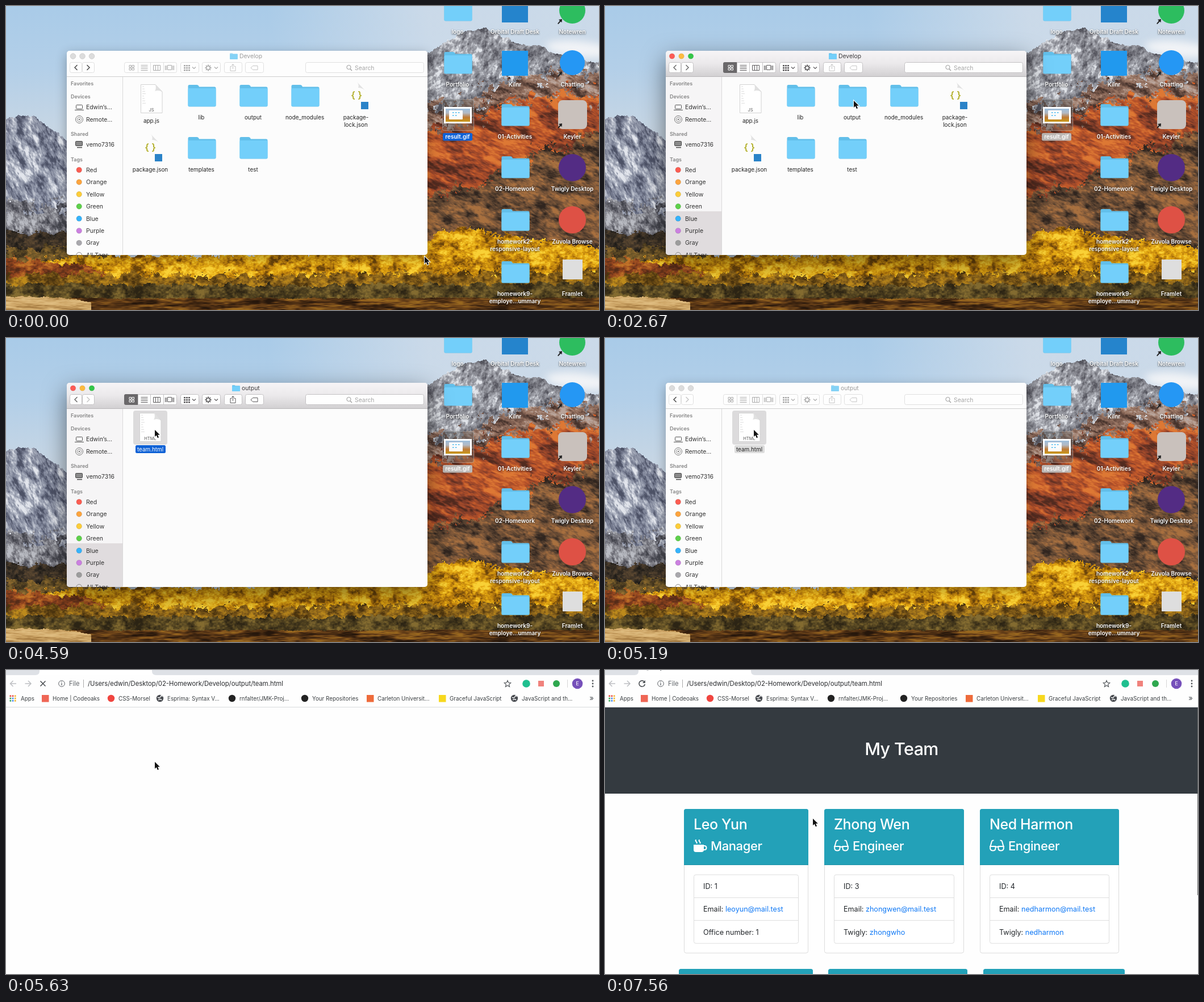
Recreate the animation shown at these times as an HTML page with a canvas. Size 1044 by 536 pixels, loop 8 s.

```html
<!DOCTYPE html>
<html lang="en">
<head>
<meta charset="utf-8">
<title>Opening a generated team page</title>
<style>
  html, body { margin: 0; width: 100%; height: 100%; overflow: hidden; background: #fff; }
  canvas { display: block; }
</style>
</head>
<body>
<canvas id="stage" width="1044" height="536"></canvas>
<script>
const W = 1044, H = 536, LOOP = 8000;
const screen = document.getElementById('stage').getContext('2d');
let c = screen;

// ---------- drawing helpers ----------
function text(str, x, y, size, color, align = 'left', weight = 400, spacing = 0) {
  c.font = `${weight} ${size}px Inter, sans-serif`;
  c.letterSpacing = spacing + 'px';
  c.textAlign = align;
  c.fillStyle = color;
  c.fillText(str, x, y + size * 0.36);
  return c.measureText(str).width;
}
function box(x, y, w, h, r, fill, border) {
  c.beginPath();
  c.roundRect(x, y, w, h, r);
  if (fill) { c.fillStyle = fill; c.fill(); }
  if (border) { c.strokeStyle = border; c.lineWidth = 1; c.stroke(); }
}
function dot(x, y, r, fill, border) {
  box(x - r, y - r, 2 * r, 2 * r, r, fill, border);
}
function fill(d, color) { c.fillStyle = color; c.fill(new Path2D(d)); }
function stroke(d, color, width = 1) {
  c.strokeStyle = color;
  c.lineWidth = width;
  c.stroke(new Path2D(d));
}
function at(x, y, draw) {
  c.save();
  c.translate(x, y);
  draw();
  c.restore();
}
function gradient(x0, y0, x1, y1, ...colors) {
  const g = c.createLinearGradient(x0, y0, x1, y1);
  colors.forEach((color, i) => g.addColorStop(i / (colors.length - 1), color));
  return g;
}
function shadow(color, blur, dy) {
  c.shadowColor = color;
  c.shadowBlur = blur;
  c.shadowOffsetY = dy;
}

// ---------- noise landscape ----------
function hash(x, y) {
  let h = Math.imul(x, 374761393) + Math.imul(y, 668265263);
  h = Math.imul(h ^ (h >>> 13), 1274126177);
  return ((h ^ (h >>> 16)) >>> 0) / 4294967296;
}
function noise(x, y) {
  const i = Math.floor(x), j = Math.floor(y);
  const ease = v => v * v * (3 - 2 * v);
  const u = ease(x - i), v = ease(y - j);
  const top = hash(i, j) * (1 - u) + hash(i + 1, j) * u;
  const bottom = hash(i, j + 1) * (1 - u) + hash(i + 1, j + 1) * u;
  return top * (1 - v) + bottom * v;
}
function roughness(x, y) {
  return (noise(x, y) + noise(x * 2, y * 2) * .7 + noise(x * 4, y * 4) * .55 + noise(x * 8, y * 8) * .45) / 2.7;
}
// Covers everything below a ragged ridge with noise coloured from dark to light.
function terrain(image, ridge, palette, { grain = [14, 10], slant = 0, jag = 16 }) {
  const colors = palette.split(' ').map(s => [0, 2, 4].map(i => parseInt(s.slice(i, i + 2), 16)));
  const last = colors.length - 1;
  for (let k = 0; k + 1 < ridge.length; k++) {
    const [x0, y0] = ridge[k], [x1, y1] = ridge[k + 1];
    for (let x = x0; x < x1; x++) {
      const edge = y0 + (y1 - y0) * (x - x0) / (x1 - x0);
      for (let y = Math.max(0, Math.floor(edge - jag)); y < H; y++) {
        const n = roughness((x - y * slant) / grain[0], (y + x * slant) / grain[1]);
        if (y < edge + jag && y < edge + (roughness(x / 14, y / 14 + 50) - .5) * jag * 3) continue;
        const shade = Math.min(.999, Math.max(0, (n - .5) * 2.3 + .5)) * last;
        const low = Math.floor(shade), mix = shade - low, p = (y * W + x) * 4;
        for (let i = 0; i < 3; i++) image.data[p + i] = colors[low][i] * (1 - mix) + colors[low + 1][i] * mix;
      }
    }
  }
}

function wallpaper() {
  c.fillStyle = gradient(0, 0, 0, 220, '#a9cbe8', '#b3cfe8', '#c7d6e4');
  c.fillRect(0, 0, W, H);
  c.fillStyle = gradient(470, 60, 740, 0, 'rgba(208,220,233,0)', 'rgba(208,220,233,.85)');
  c.fillRect(0, 0, W, 200);
  c.save();
  c.filter = 'blur(7px)';
  c.fillStyle = '#f1f3f6';
  c.beginPath();
  c.ellipse(1010, 76, 60, 14, 0.1, 0, 7);
  c.fill();
  c.restore();

  const image = c.getImageData(0, 0, W, H);
  // left range, its shaded foot and the dark woods
  terrain(image, [[0, 198], [20, 193], [48, 192], [75, 212], [107, 238], [150, 262], [190, 280]],
    '4d5266 7b8195 a3a9b8 e2e5ec', { grain: [11, 26], slant: .5, jag: 4 });
  terrain(image, [[0, 345], [60, 352], [190, 365]], '43444c 66666f 8f9097 b9bbc2', { grain: [11, 18], slant: .5, jag: 30 });
  terrain(image, [[0, 394], [50, 401], [190, 396]], '1f1c18 3b3126 5c4831', { grain: [12, 9], jag: 8 });
  terrain(image, [[0, 425], [190, 428]], '3b2f1c 6c5528 976f30', { jag: 10 });
  // right peak, autumn slopes and brown foothills
  terrain(image, [[740, 84], [775, 62], [800, 48], [845, 38], [870, 52], [900, 66], [940, 70], [960, 82], [W, 98]],
    '53535c 82838b a2a4ac e2e5ea', { grain: [14, 20], slant: -.5, jag: 4 });
  terrain(image, [[740, 178], [800, 172], [850, 155], [900, 128], [960, 118], [W, 122]],
    '46332c 77584b 9b7866 b9a49a', { grain: [24, 12], slant: -.4, jag: 32 });
  terrain(image, [[740, 218], [800, 196], [860, 180], [920, 160], [W, 156]],
    '512a1f 8a402a bd562a dd7834', { grain: [40, 14], slant: -.4, jag: 30 });
  terrain(image, [[740, 335], [830, 318], [900, 275], [970, 250], [W, 222]],
    '30251f 56402f 80593a a8703f', { grain: [30, 13], slant: -.4, jag: 26 });
  // golden trees, undergrowth, shrubs, water and dry grass
  terrain(image, [[0, 450], [110, 442], [400, 438], [740, 420], [760, 397], [800, 389], [850, 396], [900, 409], [W, 424]],
    '6a440b b4780d e4a812 f9d136', { grain: [18, 14], jag: 10 });
  terrain(image, [[0, 440], [110, 452], [170, 470], [230, 492]], '552b18 94461f c27428', { grain: [20, 12], jag: 12 });
  terrain(image, [[0, 474], [740, 472], [W, 470]], '4b340f 87601a bd8a1c', { grain: [16, 12], jag: 12 });
  terrain(image, [[0, 492], [740, 491], [W, 488]], '2c2414 524320 836b30', { grain: [18, 14], jag: 7 });
  terrain(image, [[0, 515], [W, 514]], '25160b 482b12 72471a 99681f', { grain: [50, 6], jag: 2 });
  terrain(image, [[0, 511], [100, 514], [150, 523]], 'a67c42 cda566 e0be82', { grain: [40, 5], jag: 3 });
  c.putImageData(image, 0, 0);
}

// ---------- shared icons ----------
function folder(x, y, w = 50) {
  at(x, y, () => {
    c.scale(w / 50, w / 50);
    fill('M.5 3Q.5 1 3 1H16Q18 1 19 2.500L20 4.500H47Q49.500 4.500 49.500 7V37Q49.500 39.500 47 39.500H3Q.5 39.500 .5 37Z', '#62bfea');
    box(.5, 7, 49, 32, 2, '#73cffa');
  });
}
function page(x, y, label) {
  at(x, y, () => {
    fill('M0 0H26L38 13V51H0Z', '#fff');
    stroke('M.5 .5H26L38 13V50.5H.5Z', '#d2d2d2');
    fill('M26 0Q28 8 25 12Q33 9 38 14Z', '#e0e0e0');
    for (let i = 0; i < 8; i++) stroke(`M3 ${4 + i * 4.2}h${3 + (i * 5) % 4}`, '#d4d4d4', 0.8);
    text(label, 19, 45, 7.5, '#555', 'center');
  });
}
function jsonFile(x, y) {
  fill(`M${x + 1} ${y - 23}Q${x + 5} ${y - 18} ${x + 3} ${y - 13}Q${x + 12} ${y - 13} ${x + 18} ${y - 5}Z`, '#e2e2e2');
  text('{ }', x, y, 17, '#b3b02c', 'center', 600);
  box(x + 8, y + 12, 13, 13, 0, '#2a83c8');
}
function cursor(x, y) {
  at(x, y, () => {
    const arrow = 'M0 0V12L2.8 9.5 4.9 14.2 7 13.3 5 8.7H8.8Z';
    stroke(arrow, '#fff', 2);
    fill(arrow, '#111');
  });
}

// ---------- desktop ----------
function iconLabel(str, x, y) {
  c.save();
  shadow('rgba(0,0,0,.8)', 3, 1);
  text(str, x, y, 10, '#fff', 'center', 600);
  c.restore();
}
function aliasArrow(x, y) {
  fill(`M${x} ${y + 8}L${x + 4} ${y + 3} ${x + 2} ${y + 1} ${x + 8} ${y} ${x + 7.5} ${y + 6} ${x + 5.5} ${y + 4.5} ${x + 1.5} ${y + 9}Z`, '#222');
}
function desktopIcons() {
  const folders = [
    [795, 45, 'logo'], [795, 138, 'Portfolio'], [896, 230, '01-Activities'], [896, 322, '02-Homework'],
    [896, 415, 'homework2-', 'responsive-layout'], [896, 507, 'homework9-', 'employe...ummary']];
  for (const [x, y, ...lines] of folders) {
    folder(x - 24, y - 58);
    lines.forEach((line, i) => iconLabel(line, x, y + i * 13.5));
  }
  box(873, -17, 46, 46, 0, '#2584cc');
  box(873, 79, 46, 44, 0, '#2199ee');
  dot(997, 8, 23, '#2dbd5f');
  dot(997, 100, 22, '#2597f4');
  box(972, 166, 51, 51, 8, '#c9c1bc');
  dot(997, 285, 24, '#532c84');
  dot(997, 377, 24, '#de5145');
  box(980, 447, 35, 35, 0, '#dedede');
  aliasArrow(971, 23);
  aliasArrow(971, 116);
  aliasArrow(971, 207);
  iconLabel('Orbital Draft Desk', 896, 45);
  iconLabel('Notewren', 997, 45);
  iconLabel('Kilnr', 896, 138);
  iconLabel('Chatting', 997, 138);
  iconLabel('Keyler', 997, 230);
  iconLabel('Twigly Desktop', 997, 322);
  iconLabel('Zuvola Browse', 997, 415);
  iconLabel('Framlet', 997, 507);

  box(768.5, 164.5, 55, 55, 3, 'rgba(90,90,90,.45)', 'rgba(190,190,190,.5)');
  box(771, 178, 49, 29, 0, '#fff');
  c.fillStyle = gradient(0, 181, 0, 204, '#9ebfdc', '#b3bac5', '#c07a35', '#c99a1b');
  c.fillRect(774, 181, 43, 23);
  box(780, 184, 24, 16, 1, '#fbfbfb');
  for (let i = 0; i < 5; i++) box(786 + (i % 3) * 5, 187 + (i > 2) * 5, 2.5, 2, 0, '#6fc8f3');
}

const desktop = document.createElement('canvas');
desktop.width = W;
desktop.height = H;
c = desktop.getContext('2d');
wallpaper();
desktopIcons();
c = screen;

// ---------- file window ----------
function toolbar(active, inOutput, selected) {
  const edge = active ? '#c4c2c4' : '#e0e0e0';
  const icon = active ? '#5c5a5c' : '#ababab';
  const button = (x, w) => box(x + .5, 99.5, w, 18, 3, '#fefefe', edge);
  const chevron = (x, y, color) => stroke(`M${x - 3} ${y - 1.5}l3 3 3-3`, color, 1.2);

  ['#fc5b55', '#fcbb40', '#34c648'].forEach((color, i) =>
    dot(118 + i * 16.5, 88.5, 4.8, active ? color : '#dcdcdc', active ? 'rgba(0,0,0,.08)' : '#cfcfcf'));
  c.globalAlpha = active ? 1 : .6;
  folder(inOutput ? 398 : 394, 83, 14);
  c.globalAlpha = 1;
  text(inOutput ? 'output' : 'Develop', inOutput ? 415 : 411, 88.5, 10.4, active ? '#3d3b3d' : '#9c9c9c');

  button(112, 21);
  button(134, 21);
  stroke('M125.5 104l-4.5 4.5 4.5 4.5', active ? '#666' : '#444', 1.4);
  stroke('M142.5 104l4.5 4.5-4.5 4.5', inOutput ? '#c4c4c4' : active ? '#666' : '#444', 1.4);

  button(208, 92);
  if (active) box(208, 99, 24, 19, [3, 0, 0, 3], '#6a686a');
  stroke('M232.5 100v18M254.5 100v18M277.5 100v18', edge);
  const gridColor = active ? '#fff' : icon;
  for (const [dx, dy] of [[0, 0], [5, 0], [0, 5], [5, 5]]) box(217 + dx, 104.5 + dy, 3.5, 3.5, 0, null, gridColor);
  stroke('M237.5 104.5h12M237.5 107.5h12M237.5 110.5h12M237.5 113.5h12', icon, 1.2);
  stroke('M259.5 104.5h12v9h-12zM263.5 104.5v9M267.5 104.5v9', icon);
  stroke('M284.5 104.5h7v8h-7zM280.5 105v8M282.5 105v8M293.5 105v8M295.5 105v8', icon);

  button(307, 32);
  for (let i = 0; i < 9; i++) box(313 + (i % 3) * 4, 104 + Math.floor(i / 3) * 4, 3, 2.5, 0, icon);
  chevron(331, 109, icon);
  button(345, 32);
  dot(356, 109, 3.2, null, icon);
  for (let a = 0; a < 8; a++) at(356, 109, () => { c.rotate(a * Math.PI / 4); box(-1, -5.5, 2, 3, 0, icon); });
  chevron(370, 109, icon);

  const action = active && selected ? '#5c5a5c' : '#c6c6c6';
  button(384, 31);
  stroke('M397.5 106.5h-2.5v8h9v-8h-2.5M399.5 111v-8.5M397 105l2.5-2.5 2.5 2.5', action);
  button(421, 32);
  stroke('M431 109l3.5-3.5h8.5v7h-8.5z', action);

  button(527, 208);
  dot(603.5, 108, 3.6, null, '#9a9a9a');
  stroke('M606 111l3 3', '#9a9a9a', 1.2);
  text('Search', 614, 109, 10.4, '#a6a6a6');
}

function sidebar(active) {
  c.fillStyle = active ? '#f6f5f6' : '#fcfcfc';
  c.fillRect(107, 125, 98, 313);
  if (active) {
    c.fillStyle = '#e0dcde';
    c.fillRect(107, 362, 98, 77);
  }
  c.fillStyle = '#dadada';
  c.fillRect(205, 125, 1, 313);
  [['Favorites', 137], ['Devices', 160], ['Shared', 226], ['Tags', 271]].forEach(([s, y]) =>
    text(s, 114, y, 9, '#858585', 'left', 600));
  text('Edwin’s...', 141, 178.5, 10.4, '#333');
  text('Remote...', 141, 200, 10.4, '#333');
  text('vemo7316', 141, 244.5, 10.4, '#333');
  box(123.5, 174.5, 11, 7, 1, null, '#555');
  stroke('M121 183.5h16', '#555', 1.2);
  dot(129, 200, 6.5, null, '#777');
  dot(129, 200, 3.8, null, '#999');
  dot(129, 200, 1.3, '#777');
  box(122.5, 238.5, 12, 8, 1, '#8a8a8a', '#444');
  stroke('M125 249.5h9', '#444', 1.5);
  const tags = [['Red', '#fb5c51'], ['Orange', '#fca43e'], ['Yellow', '#fccd3a'], ['Green', '#5ed04b'],
    ['Blue', '#35b3fb'], ['Purple', '#cb80e0'], ['Gray', active ? '#9c9c9c' : '#a9a8ad'], ['All Tags...', null]];
  tags.forEach(([name, color], i) => {
    const y = 289 + i * 21.45;
    dot(128.7, y, 4.8, color, color ? 'rgba(0,0,0,.12)' : '#888');
    text(name, 141, y, 10.5, '#333');
  });
}

function selection(x, y, active) {
  box(x - 30, y - 68, 60, 60, 4, '#dcdbdc');
  box(x - 26, y - 7, 53, 14, 2.5, active ? '#0f62d6' : '#dcdcdc');
}
function files(active, inOutput, selected) {
  const label = (s, x, y, color = '#222') => text(s, x, y, 9.9, color, 'center');
  const picked = selected && active ? '#fff' : '#222';
  if (inOutput) {
    if (selected) selection(254, 196, active);
    page(235, 132, 'HTML');
    label('team.html', 254, 196, picked);
    return;
  }
  if (selected) selection(435, 196, active);
  page(237, 138, 'JS');
  label('app.js', 256, 202);
  for (const [name, x, y] of [['lib', 344, 196], ['output', 435, 196], ['node_modules', 526, 196],
    ['templates', 344, 288], ['test', 435, 288]]) {
    folder(x - 24, y - 58);
    label(name, x, y, name === 'output' ? picked : '#222');
  }
  jsonFile(617, 157);
  label('package-', 616, 196);
  label('lock.json', 616, 209);
  jsonFile(254, 249);
  label('package.json', 254, 288);
}

function fileWindow(active, inOutput, selected) {
  c.save();
  shadow(active ? 'rgba(0,0,0,.5)' : 'rgba(0,0,0,.3)', active ? 40 : 20, active ? 14 : 6);
  box(107, 79, 635, 360, 5, '#fcfcfc');
  c.restore();
  c.save();
  c.beginPath();
  c.roundRect(107, 79, 635, 360, 5);
  c.clip();
  c.fillStyle = active ? gradient(0, 79, 0, 124, '#f6f4f6', '#ebe9eb', '#d2d0d2') : '#fdfdfd';
  c.fillRect(107, 79, 635, 45);
  c.fillStyle = active ? '#b9b7b9' : '#cfcfcf';
  c.fillRect(107, 124, 635, 1);
  sidebar(active);
  toolbar(active, inOutput, selected);
  files(active, inOutput, selected);
  c.restore();
}

// ---------- browser ----------
const bookmarks = [
  [69, '#ef6655', 'square', 'Home | Codeoaks'], [185, '#f0453f', 'circle', 'CSS-Morsel'],
  [271, '#484b50', 'globe', 'Esprima: Syntax V...'], [398, '#222', 'circle', 'rnfalter/JMK-Proj...'],
  [526, '#222', 'circle', 'Your Repositories'], [641, '#ee6b3b', 'square', 'Carleton Universit...'],
  [768, '#f7d81e', 'square', 'Graceful JavaScript'], [895, '#484b50', 'globe', 'JavaScript and th...']];

function browserBar(loading, title) {
  c.fillStyle = '#dee1e6';
  c.fillRect(-7, -26, 1060, 35);
  fill('M52 9Q59 9 59 2V-12Q59 -19 66 -19H250Q257 -19 257 -12V2Q257 9 264 9Z', '#fff');
  ['#f8605a', '#f9bd45', '#4bc353'].forEach((color, i) => dot(9 + i * 16, -9, 5.5, color));
  if (title !== 'Untitled') dot(75, -5, 5.5, '#5f6368');
  text(title, 87, -5, 10.5, '#45494d');
  stroke('M240-8l6 6m0-6l-6 6M269-5h10m-5-5v10', '#5f6368', 1.4);

  stroke('M18 24H7.5m5-5l-5 5 5 5', '#bdbfc2', 1.5);
  stroke('M33.5 24H44m-5-5l5 5-5 5', '#bdbfc2', 1.5);
  if (loading) stroke('M60.5 19.5l9 9m0-9l-9 9', '#4c5054', 1.6);
  else {
    stroke('M69 20.5A5.2 5.2 0 1 0 70.3 25', '#4c5054', 1.6);
    fill('M70.8 18v5h-5z', '#4c5054');
  }
  dot(98, 24, 5.3, null, '#5f6368');
  stroke('M98 23v4M98 20.6v1.2', '#5f6368', 1.3);
  text('File', 111, 24, 11.2, '#5f6368');
  stroke('M136.5 17v14', '#aaa');
  text('/Users/edwin/Desktop/02-Homework/Develop/output/team.html', 144, 24, 11.3, '#2a2c2f');
  stroke('M883 18.5l1.6 3.8 4.1.4-3.1 2.7.9 4-3.5-2.1-3.5 2.1.9-4-3.1-2.7 4.1-.4z', '#55595d', 1.2);
  dot(916, 24, 6.8, '#1fbf8f');
  box(937, 19, 10, 10, 0, '#f0827c');
  dot(969, 24, 6, '#2fa84f');
  stroke('M988.5 17v14', '#d5d5d5');
  dot(1006, 24, 9.3, '#7650ba');
  text('E', 1006, 24, 9.5, '#fff', 'center');
  for (const y of [19, 24, 29]) dot(1033, y, 1.4, '#55595d');

  ['#e8453c', '#e8453c', '#f2b632', '#3aa757', '#4285f4', '#f2b632', '#3aa757', '#4285f4', '#f2b632'].forEach((color, i) =>
    box(6.5 + (i % 3) * 4.2, 44.5 + Math.floor(i / 3) * 4.2, 2.7, 2.7, 0, color));
  text('Apps', 26, 50, 9.8, '#3c4043');
  for (const [x, color, shape, name] of bookmarks) {
    if (shape === 'square') box(x - 6, 44, 12.5, 12.5, 0, color);
    else dot(x, 50, 6.2, color);
    if (shape === 'globe') stroke(`M${x - 4} 48q3 3 5-1t3 0M${x - 3} 53q4-3 6 0`, '#fff', 1.4);
    text(name, x + 13, 50, 9.8, '#3c4043');
  }
  text('»', 1031, 49.5, 13, '#4c5054', 'center');
  c.fillStyle = '#d8dadd';
  c.fillRect(-7, 65, 1060, 1);
}

const mug = () => {
  fill('M0 9H18V18Q18 22 14 22H4Q0 22 0 18Z', '#fff');
  stroke('M17 11H19Q22.5 11 22.5 14.5T19 18H17', '#fff', 2);
  stroke('M5.5 7Q6 4.5 4.5 3.5T4 0M11.5 7Q12 4.5 10.5 3.5T10 0', '#fff', 2);
};
const glasses = () => {
  stroke('M1.2 12H10.5V16Q10 19.5 6 19.5T1.2 16ZM15.5 12H24.8V16Q24 19.5 20 19.5T15.5 16ZM10.5 13.5Q13 12 15.5 13.5', '#fff', 2);
  stroke('M1.2 13L4 3Q4.5 1 7.5 1.5M24.8 13L22 3Q21.5 1 18.5 1.5', '#fff', 2);
};
const team = [
  { x: 139, w: 219, name: 'Leo Yun', role: 'Manager', icon: mug, textX: 47,
    rows: [['ID: 1'], ['Email: ', 'leoyun@mail.test'], ['Office number: 1']] },
  { x: 386, w: 246, name: 'Zhong Wen', role: 'Engineer', icon: glasses, textX: 50,
    rows: [['ID: 3'], ['Email: ', 'zhongwen@mail.test'], ['Twigly: ', 'zhongwho']] },
  { x: 660, w: 245, name: 'Ned Harmon', role: 'Engineer', icon: glasses, textX: 50,
    rows: [['ID: 4'], ['Email: ', 'nedharmon@mail.test'], ['Twigly: ', 'nedharmon']] }];

function card({ x, w, name, role, icon, textX, rows }) {
  box(x + .5, 245.5, w - 1, 253.5, 3.5, '#fff', '#dcdcdc');
  box(x, 245, w, 99, [3.5, 3.5, 0, 0], '#23a1b8');
  c.fillStyle = '#1f91a6';
  c.fillRect(x, 343, w, 1);
  text(name, x + 17, 271.5, 25, '#fff', 'left', 500, -.4);
  at(x + 17, 299, icon);
  text(role, x + textX, 310.5, 22, '#fff', 'left', 500, -.4);
  box(x + 17.5, 361, w - 35, 121, 3.5, null, '#dedede');
  stroke(`M${x + 17} 401.5h${w - 34}M${x + 17} 441.5h${w - 34}`, '#dedede');
  rows.forEach(([label, link], i) => {
    const y = 381 + i * 40.5;
    const width = text(label, x + 34, y, 12.6, '#212529');
    if (link) text(link, x + 34 + width, y, 12.6, '#0f78f5');
  });
}
function teamPage() {
  c.fillStyle = '#343a40';
  c.fillRect(0, 66, W, 152);
  text('My Team', 522, 139.5, 30.5, '#fff', 'center', 500, -.6);
  team.forEach(card);
  for (const [x, w] of [[130, 236], [393, 245], [666, 249]]) box(x, 527, w, 20, 3.5, '#23a1b8');
  c.fillStyle = '#6b6b6b';
  c.fillRect(1043, 66, 1, 331);
}
function browser(scale, alpha, loaded, loading) {
  c.save();
  c.translate(521.5, 265.5);
  c.scale(scale, scale);
  c.translate(-521.5, -265.5);
  c.globalAlpha = alpha;
  c.beginPath();
  c.roundRect(-7, -26, 1060, 586, 6);
  c.clip();
  c.fillStyle = '#fefefe';
  c.fillRect(-7, -26, 1060, 586);
  browserBar(loading, loaded ? 'My Team' : 'Untitled');
  if (loaded) teamPage();
  c.restore();
}

// ---------- timeline ----------
const pointer = [
  [0, 737, 442], [150, 690, 402], [300, 560, 298], [440, 482, 235],
  [880, 478, 229], [1030, 468, 215], [1180, 455, 199], [1330, 445, 187], [1480, 440, 181],
  [2670, 438, 167], [3710, 410, 169], [3860, 345, 167], [4000, 285, 164], [4150, 262, 162],
  [7260, 282, 185], [7410, 336, 237], [7560, 366, 262]];
const zoom = [[5340, .45, .2], [5480, .629, .56], [5630, 1, 1]];
const latest = (steps, t) => steps.findLast(step => step[0] <= t);

function draw(t) {
  const opened = latest(zoom, t);
  if (t < 5630) {
    const active = t >= 1930 && t < 4890;
    const inOutput = t >= 3120;
    const selected = inOutput ? t >= 4450 : t >= 2820;
    c.drawImage(desktop, 0, 0);
    box(769, 224, 52, 13.5, 2.5, t < 1930 ? '#0f62d6' : '#bdb8b5');
    text('result.gif', 795, 230.5, 10, '#fff', 'center', 600);
    fileWindow(active, inOutput, selected);
  }
  if (opened) browser(opened[1], opened[2], t >= 6080, t < 6370);
  const [, x, y] = latest(pointer, t);
  cursor(x, y);
}
const start = performance.now();
function frame(now) {
  draw(Math.max(0, now - start) % LOOP);
  requestAnimationFrame(frame);
}
draw(0);
requestAnimationFrame(frame);
</script>
</body>
</html>
```
